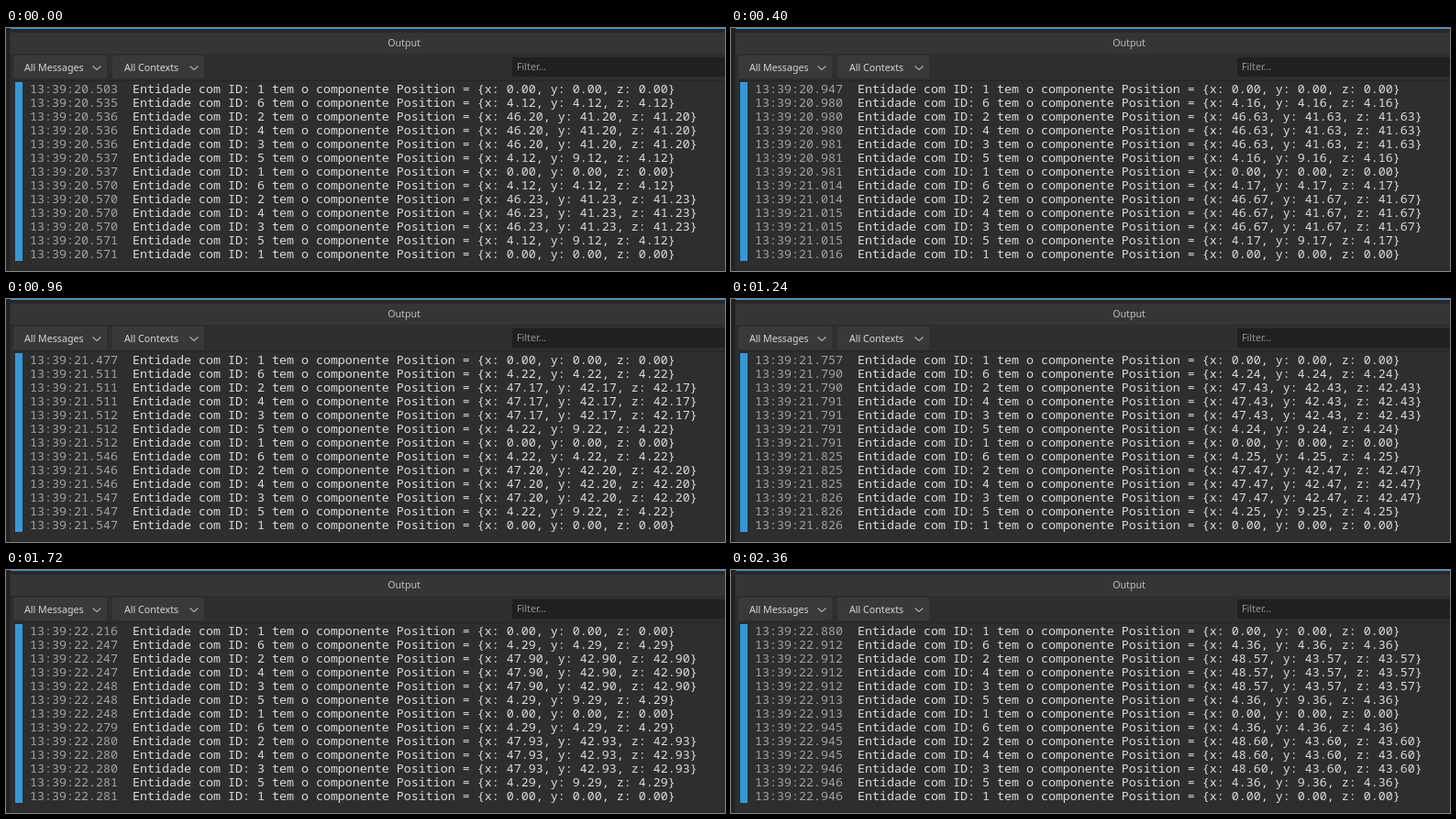
An HTML page for the animation above (2.44 s loop, 784x265 px).

```html
<!DOCTYPE html>
<html lang="pt">
<head>
<meta charset="utf-8">
<title>Output</title>
<style>
  html, body { margin: 0; width: 100%; height: 100%; overflow: hidden; background: #2e2e2e; }
  svg { display: block; }
  text { white-space: pre; }
  .ui { font: 10.67px "Noto Sans", "Open Sans", sans-serif; fill: #d6d6d6; }
  .log { font: 13.333px "Noto Sans Mono", "DejaVu Sans Mono", monospace; fill: #dcdcdc; }
  .time { fill: #a2a2a2; }
</style>
</head>
<body>
<svg width="784" height="265" viewBox="0 0 784 265">
  <rect width="784" height="265" fill="#2e2e2e"/>
  <rect x="5" width="779" height="28" fill="#353535"/>
  <rect width="784" height="5" fill="#272727"/>
  <rect x="5" width="779" height="1" fill="#3498db"/>
  <rect width="4" height="265" fill="#222"/>
  <rect x="4" y="5" width="1" height="260" fill="#292929"/>
  <g fill="#393939">
    <rect x="8" y="30" width="102" height="25" rx="2"/>
    <rect x="116" y="30" width="100" height="25" rx="2"/>
  </g>
  <rect x="552" y="32" width="232" height="21" fill="#202020"/>
  <rect x="8" y="57" width="776" height="1" fill="#262626"/>
  <path d="M94.5 41.5l4.5 4 4.5-4M200.5 41.5l4.5 4 4.5-4" fill="none" stroke="#a8a8a8" stroke-width="1.3"/>
  <g class="ui">
    <text x="434" y="20" text-anchor="middle" style="fill:#bdbdbd">Output</text>
    <text x="20" y="47">All Messages</text>
    <text x="129" y="47">All Contexts</text>
    <text x="557" y="46" style="fill:#949494">Filter...</text>
  </g>
  <rect x="10" y="59" width="8" height="195" fill="#3498db"/>
  <g class="log" id="log"></g>
</svg>
<script>
const LOOP = 2440, TICK = 40, ROWS = 13;
const IDS = [6, 2, 4, 3, 5, 1];

// Playback time, batches written so far, clock in ms after 13:39:20.
const KEYS = [
  [0, 1.55, 570], [400, 14.55, 1014.5], [760, 24.55, 1336.7], [1240, 38.55, 1825.3],
  [1720, 52.55, 2279.8], [2000, 63.01, 2628.5], [2360, 72.55, 2945.2]
];
// Times at which the log misses a refresh.
const HOLDS = [440, 1120, 1680, 2040, 2320, 2400];

// Linear map from one column of KEYS to another, open at both ends.
function interp(from, to, x) {
  let i = KEYS.length - 2;
  while (i > 0 && KEYS[i][from] > x) i--;
  const a = KEYS[i], b = KEYS[i + 1];
  return a[to] + (b[to] - a[to]) * (x - a[from]) / (b[from] - a[from]);
}

function stamp(batch, slot) {
  const ms = Math.floor(interp(1, 2, batch + 0.55) + 0.3 * slot);
  return "13:39:" + (20 + Math.floor(ms / 1000)) + "." + String(ms % 1000).padStart(3, "0");
}

function position(id, batch) {
  const v = 41.2 + batch / 30;
  if (id === 1) return [0, 0, 0];
  if (id === 6) return [v / 10, v / 10, v / 10];
  if (id === 5) return [v / 10, v / 10 + 5, v / 10];
  return [v + 5, v, v];
}

function message(id, batch) {
  const [x, y, z] = position(id, batch).map(n => n.toFixed(2));
  return `  Entidade com ID: ${id} tem o componente Position = {x: ${x}, y: ${y}, z: ${z}}`;
}

// A batch is written in a burst, so a refresh rarely sees only its first line.
function lastLine(t) {
  const written = interp(0, 1, t);
  const batch = Math.floor(written);
  return batch * 6 + (written - batch < 0.02 ? 0 : 5);
}

const NS = "http://www.w3.org/2000/svg";
function add(parent, tag, attrs) {
  const el = document.createElementNS(NS, tag);
  for (const key in attrs) el.setAttribute(key, attrs[key]);
  return parent.appendChild(el);
}

const log = document.getElementById("log");
const lines = Array.from({ length: ROWS }, (_, i) => {
  const text = add(log, "text", { x: 26, y: 71 + 15 * i });
  return { time: add(text, "tspan", { class: "time" }), body: add(text, "tspan", {}) };
});

let shown = -1;
function draw(t) {
  let tick = Math.floor(t / TICK) * TICK;
  if (HOLDS.includes(tick)) tick -= TICK;
  if (tick === shown) return;
  shown = tick;
  const first = lastLine(tick) - ROWS + 1;
  lines.forEach((line, i) => {
    const batch = Math.floor((first + i) / 6);
    const slot = first + i - batch * 6;
    line.time.textContent = stamp(batch, slot);
    line.body.textContent = message(IDS[slot], batch);
  });
}

const start = performance.now();
function frame() {
  draw((performance.now() - start) % LOOP);
  requestAnimationFrame(frame);
}
frame();
</script>
</body>
</html>
```
